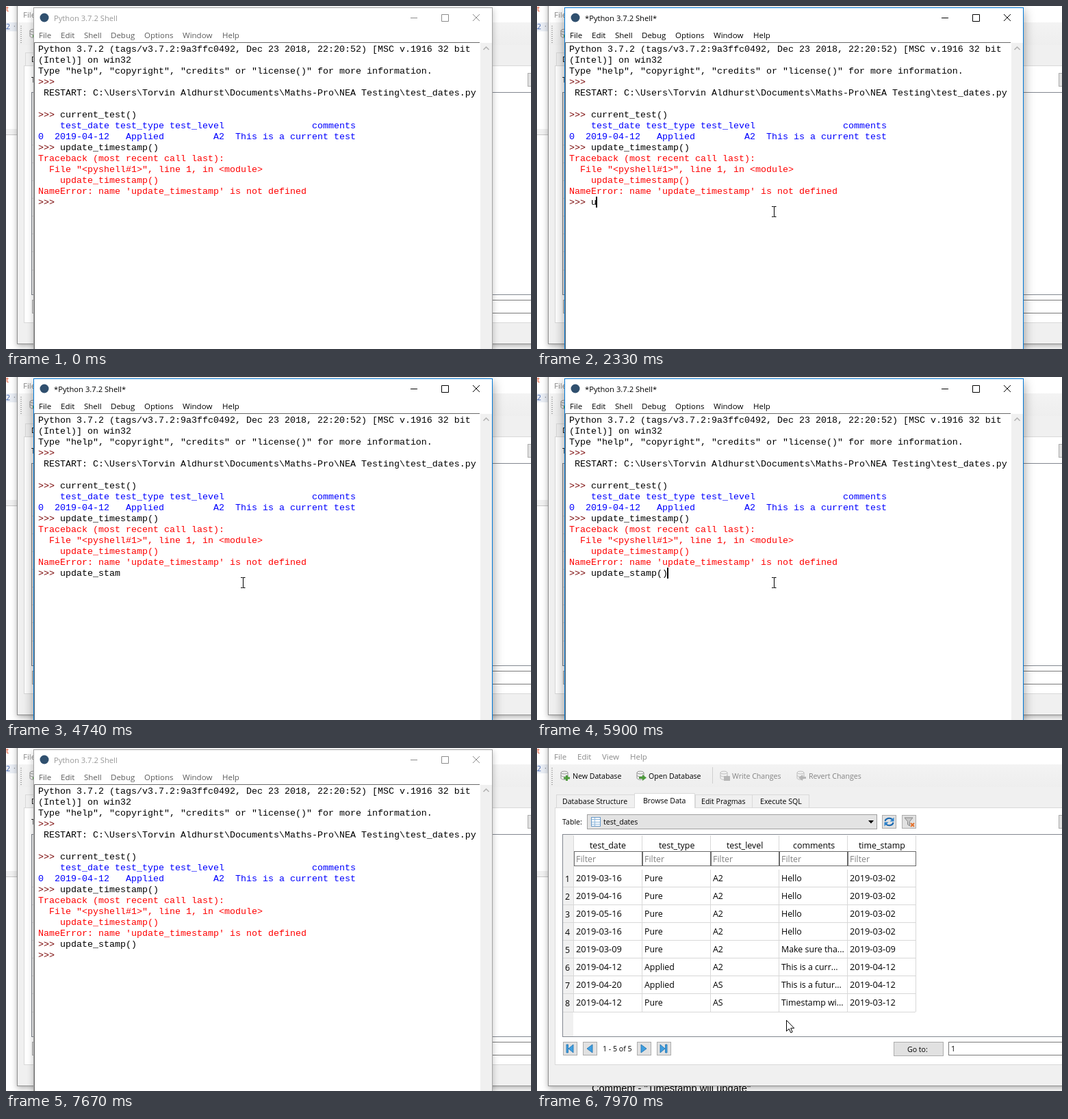
Recreate the animation shown at these times as an HTML page. Size 767 by 502 pixels, loop 8000 ms.

```html
<!DOCTYPE html>
<html lang="en">
<head>
<meta charset="utf-8">
<title>Shell session</title>
<style>
  html, body { margin: 0; width: 100%; height: 100%; overflow: hidden; background: #fff; }
  svg { display: block; width: 767px; height: 502px; }
  text { white-space: pre; font-family: "Open Sans", "Noto Sans", sans-serif; }
  .small { font-size: 10.6px; }
  .menu { font-size: 11.5px; }
  .title { font-size: 11.2px; }
  .cell { font-size: 12.4px; }
  .date { font-size: 12.8px; }
  .page { font: 14.67px "Liberation Sans", Arial, sans-serif; }
  .code { font: 13.333px "Liberation Mono", "Courier New", monospace; }
  .prompt { fill: #770000; }
  .out { fill: #0000ff; }
  .err { fill: #ff0000; }
  .line { fill: none; stroke: #000; }
  .frame { fill: #fff; stroke: #a3a3a3; filter: drop-shadow(0 3px 5px rgba(0,0,0,.25)); }
  .title { fill: #999; }
  #menus { fill: #5c5c5c; }
  #controls { fill: none; stroke: #8c8c8c; }
  .active .frame { stroke: #0078d7; filter: drop-shadow(0 5px 8px rgba(0,0,0,.4)); }
  .active .title, .active #menus { fill: #000; }
  .active #controls { stroke: #000; }
</style>
</head>
<body>
<svg id="stage" viewBox="0 0 767 502">
  <defs>
    <linearGradient id="bar" x2="0" y2="1">
      <stop stop-color="#f3f3f3"/><stop offset="1" stop-color="#eeeeee"/>
    </linearGradient>
    <g id="cylinder" fill="#f2f2f2" stroke="#8a8a8a" stroke-width=".9">
      <path d="M1 3v8c0 3 10 3 10 0V3"/><path d="M1 7c0 2.6 10 2.6 10 0" fill="none"/>
      <ellipse cx="6" cy="3" rx="5" ry="2"/>
    </g>
  </defs>
  <g id="desktop"></g>
  <g id="database"></g>
  <g id="shell">
    <rect class="frame" x="40.5" y="2.5" width="670" height="530"/>
    <circle cx="56" cy="17" r="6.5" fill="#30506f"/>
    <text id="title" class="title" x="70" y="22"></text>
    <path id="controls" d="M591 17.5h10M636.5 12.5h10v10h-10zM682 12l10 10m0-10l-10 10"/>
    <g id="menus"></g>
    <rect x="693" y="54" width="17" height="460" fill="#f0f0f0"/>
    <path class="line" d="M697.5 64l4-4 4 4" stroke="#b0b0b0" stroke-width="1.5" style="stroke:#b0b0b0"/>
    <path class="line" d="M41.5 510V53.5H692" style="stroke:#696969"/>
    <g id="log"></g>
    <rect id="match" x="175" y="279" width="16" height="16" fill="#808080"/>
    <text id="typed" class="code" x="79" y="291"></text>
    <text id="next" class="code prompt" x="47" y="307">&gt;&gt;&gt;</text>
    <rect id="caret" width="2" height="16"/>
  </g>
  <circle id="click" cx="338" cy="288" r="12" fill="#f7ee3c" fill-opacity=".75"/>
  <path id="beam" class="line" d="M-3 -7.5h2.5l.5 .5 .5-.5H3.5M.5 -7V7M-3 7.5h2.5l.5-.5 .5 .5H3.5"/>
  <path id="arrow" d="M.5 .5v16l3.7-3.5 2.6 5.7 2.4-1.1-2.5-5.5h5z" fill="#fff" stroke="#000"/>
</svg>
<script>
const $ = id => document.getElementById(id);
const esc = s => s.replace(/&/g, '&amp;').replace(/</g, '&lt;');
const text = (x, y, s, cls = 'small', fill = '') =>
  `<text class="${cls}" x="${x}" y="${y}"${fill && ` fill="${fill}"`}>${esc(s)}</text>`;
const rect = (x, y, w, h, fill, stroke = 'none') =>
  `<rect x="${x}" y="${y}" width="${w}" height="${h}" fill="${fill}" stroke="${stroke}"/>`;
const path = (d, stroke, fill = 'none', width = 1) =>
  `<path d="${d}" stroke="${stroke}" fill="${fill}" stroke-width="${width}"/>`;
const button = (x, y, w, h) => rect(x + .5, y + .5, w, h, '#e1e1e1', '#adadad');
const range = n => [...Array(n).keys()];

function drawDesktop() {
  $('desktop').innerHTML =
    rect(0, 0, 767, 502, '#fff') +
    text(-4, 8, 'tt', 'menu', '#e0451f') +
    rect(0, 24, 16, 13, '#e9edf4') +
    text(0, 34, '2', 'small', '#4467b0') + text(11, 33, '·', 'small', '#888') +
    rect(0, 180, 16, 8, '#f1f1f1') + path('M0 188.5H16', '#c8c8c8') +
    text(80, 503, 'Comment - "Timestamp will update"', 'page');
}

function toolbarItem(x, label, mark, enabled = true) {
  return `<g opacity="${enabled ? 1 : .55}"><use href="#cylinder" x="${x}" y="33"/>` +
    path(mark, 'none', enabled ? '#4d9a3c' : '#888') + '</g>' +
    text(x + 18, 45, label, 'small', enabled ? '#000' : '#838383');
}

function navButton(x, d) {
  return button(x, 430, 20, 19) + path(d, '#1e6fae', '#3f9fe0', .8);
}

function drawTable() {
  const heads = ['test_date', 'test_type', 'test_level', 'comments', 'time_stamp'];
  const headX = [77, 178, 277, 374, 470];
  const rows = [
    '2019-03-16|Pure|A2|Hello|2019-03-02',
    '2019-04-16|Pure|A2|Hello|2019-03-02',
    '2019-05-16|Pure|A2|Hello|2019-03-02',
    '2019-03-16|Pure|A2|Hello|2019-03-02',
    '2019-03-09|Pure|A2|Make sure tha...|2019-03-09',
    '2019-04-12|Applied|A2|This is a curr...|2019-04-12',
    '2019-04-20|Applied|AS|This is a futur...|2019-04-12',
    '2019-04-12|Pure|AS|Timestamp wi...|2019-03-12'
  ];
  let out = rect(37.5, 126.5, 740, 296, '#fff', '#828790') +
    rect(38, 127, 15, 295, '#f0f0f0');
  heads.forEach((head, i) => {
    const x = 54 + 100 * i;
    out += text(headX[i], 147, head, 'cell') +
      path(`M${x + 99.5} 128V150M${x + 99.5} 178V386`, '#d8d8d8') +
      rect(x + .5, 151.5, 99, 21, '#fff', '#6a6a6a') +
      text(x + 3, 167, 'Filter', 'cell', '#808080');
  });
  out += path('M53.5 128V386', '#d8d8d8');
  rows.forEach((row, r) => {
    const y = 195 + 26 * r;
    out += path(`M38 ${y + 8.5 + (r > 6)}H553`, '#d8d8d8') + text(41, y + 1, `${r + 1}`, 'cell');
    row.split('|').forEach((s, i) => {
      out += text(57 + 100 * i, y, s, i % 4 ? 'cell' : 'date');
    });
  });
  return out;
}

function drawDatabase() {
  const tab = (x, w, label, dx = 9) =>
    rect(x + .5, 68.5, w, 19, '#f0f0f0', '#d9d9d9') + text(x + dx, 82, label);
  const menus = [[25, 'File'], [59, 'Edit'], [95, 'View'], [136, 'Help']];
  $('database').innerHTML =
    '<rect x="16.5" y="-20" width="780" height="514.5" fill="#f0f0f0" stroke="#8f8f8f" style="filter:drop-shadow(0 3px 4px rgba(0,0,0,.3))"/>' +
    rect(17, 0, 750, 24, '#fff') +
    menus.map(([x, s]) => text(x, 17, s, 'menu', '#8a8a8a')).join('') +
    rect(17, 24, 750, 33, 'url(#bar)') +
    range(9).map(i => rect(21, 29 + 3 * i, 2, 1, '#a5a5a5')).join('') +
    toolbarItem(34, 'New Database', 'M42 40h3v2.500h3v3h-3v2.500h-3v-2.500h-3v-3h3z') +
    toolbarItem(145, 'Open Database', 'M149 42h5v-3l6 4.500-6 4.500v-3h-5z') +
    path('M256.5 28V52', '#cfcfcf') +
    toolbarItem(267, 'Write Changes', 'M273 41h9v7h-9z', false) +
    toolbarItem(379, 'Revert Changes', 'M393 42h-5v-3l-6 4.500 6 4.500v-3h5z', false) +
    rect(26.5, 87.5, 750, 376, '#fff', '#d9d9d9') +
    tab(28, 114, 'Database Structure') + tab(231, 83, 'Edit Pragmas') +
    tab(314, 83, 'Execute SQL', 12) +
    path('M142.500 88V66.500H230.500V88', '#d9d9d9', '#fff') + text(155, 81, 'Browse Data') +
    text(37, 112, 'Table:') + rect(73.5, 97.5, 423, 21, '#e3e3e3', '#a0a0a0') +
    rect(79.5, 101.5, 13, 13, '#fff', '#6698c8') +
    path('M80 104.500h12M80 108.500h12M80 111.500h12M84.500 102v12', '#8fb8dc') +
    text(97, 112, 'test_dates') + path('M484 106h8l-4 4.500z', 'none', '#000') +
    button(504, 98, 20, 19) +
    path('M508.500 107a6 5 0 0 1 10.500-2.500M520.500 109a6 5 0 0 1-10.500 2.500', '#1767b0', 'none', 2) +
    path('M521.500 101.500v6h-6zM507.500 114.500v-6h6z', 'none', '#2d82cc') +
    button(533, 98, 20, 19) +
    path('M537 102h12l-4.500 5.500v6.500l-3-2v-4.500z', '#888', '#c8c8c8') +
    path('M546 110l5 5m0-5l-5 5', '#e4722c', 'none', 2) +
    button(762, 98, 20, 19) +
    drawTable() +
    navButton(38, 'M43 434h2.500v12H43zM53 434v12l-7-6z') +
    navButton(67, 'M81 434v12l-8-6z') +
    text(96, 444, '1 - 5 of 5') +
    navButton(146, 'M152 434v12l8-6z') +
    navButton(175, 'M180 434v12l7-6zM187.500 434h2.500v12h-2.500z') +
    button(521, 430, 72, 20) + text(541, 445, 'Go to:') +
    rect(601.5, 430.5, 180, 19, '#fff', '#7a7a7a') + text(605, 444, '1');
}

function drawShell() {
  $('menus').innerHTML =
    [[48, 'File'], [80, 'Edit'], [114, 'Shell'], [153, 'Debug'], [202, 'Options'], [258, 'Window'], [316, 'Help']]
      .map(([x, s]) => text(x, 47, s, 'menu')).join('');
  const log = [
    ['', 'Python 3.7.2 (tags/v3.7.2:9a3ffc0492, Dec 23 2018, 22:20:52) [MSC v.1916 32 bit'],
    ['', '(Intel)] on win32'],
    ['', 'Type "help", "copyright", "credits" or "license()" for more information.'],
    ['prompt', '>>>'],
    ['', ' RESTART: C:\\Users\\Torvin Aldhurst\\Documents\\Maths-Pro\\NEA Testing\\test_dates.py'],
    ['', ''],
    ['prompt', '>>>', 'current_test()'],
    ['out', '    test_date test_type test_level                comments'],
    ['out', '0  2019-04-12   Applied         A2  This is a current test'],
    ['prompt', '>>>', 'update_timestamp()'],
    ['err', 'Traceback (most recent call last):'],
    ['err', '  File "<pyshell#1>", line 1, in <module>'],
    ['err', '    update_timestamp()'],
    ['err', "NameError: name 'update_timestamp' is not defined"],
    ['prompt', '>>>']
  ];
  $('log').innerHTML = log.map(([cls, s, input = ''], i) =>
    text(47, 67 + 16 * i, s, 'code ' + cls) + text(79, 67 + 16 * i, input, 'code')).join('');
}

const command = 'update_stamp()';
const start = {
  shell: true, active: false, edited: false, typed: 0, caret: false,
  match: false, next: false, click: false, beam: null, arrow: null
};
// Each entry changes part of the state from its time (ms) on.
const events = [
  [70, { beam: [433, 330] }],
  [140, { beam: [401, 315] }],
  [1230, { beam: [340, 288] }],
  [1310, { active: true, click: true }],
  [1500, { click: false, caret: true }],
  [1640, { beam: [343, 295] }],
  [1710, { beam: [346, 301] }],
  [2030, { caret: false }],
  [2180, { edited: true, typed: 1 }],
  [2330, { caret: true }],
  [2410, { typed: 2 }],
  [2490, { typed: 3 }],
  [2570, { typed: 4 }],
  [2800, { typed: 5 }],
  [2880, { typed: 6 }],
  [2960, { caret: false }],
  [3260, { caret: true }],
  [3430, { typed: 7 }],
  [3730, { typed: 8 }],
  [3810, { typed: 9, caret: false }],
  [4120, { typed: 10, caret: true }],
  [4740, { typed: 11, caret: false }],
  [4970, { typed: 12, caret: true }],
  [5590, { caret: false }],
  [5820, { typed: 13 }],
  [5900, { typed: 14, caret: true }],
  [6050, { match: true }],
  [6450, { match: false }],
  [6530, { caret: false }],
  [6610, { next: true, edited: false }],
  [6830, { caret: true, beam: [372, 310] }],
  [6910, { beam: [470, 350] }],
  [6980, { beam: [590, 415] }],
  [7060, { beam: [670, 460] }],
  [7210, { beam: [674, 474] }],
  [7290, { beam: null }],
  [7370, { caret: false }],
  [7670, { active: false }],
  [7750, { shell: false }],
  [7890, { arrow: [582, 451] }],
  [7970, { arrow: [364, 398] }]
];

const show = (id, on) => { $(id).style.display = on ? '' : 'none'; };
function place(id, pos) {
  show(id, pos);
  if (pos) $(id).setAttribute('transform', `translate(${pos})`);
}

function render(time) {
  const s = Object.assign({}, start, ...events.filter(([at]) => at <= time).map(e => e[1]));
  for (const id of ['shell', 'caret', 'match', 'next', 'click']) show(id, s[id]);
  place('beam', s.beam);
  place('arrow', s.arrow);
  $('shell').classList.toggle('active', s.active);
  $('title').textContent = s.edited ? '*Python 3.7.2 Shell*' : 'Python 3.7.2 Shell';
  $('typed').textContent = command.slice(0, s.typed);
  $('caret').setAttribute('x', 78 + (s.next ? 0 : 8 * s.typed));
  $('caret').setAttribute('y', s.next ? 295 : 279);
}

drawDesktop();
drawDatabase();
drawShell();
render(0);
const begin = performance.now();
requestAnimationFrame(function tick() {
  render((performance.now() - begin) % 8000);
  requestAnimationFrame(tick);
});
</script>
</body>
</html>
```
